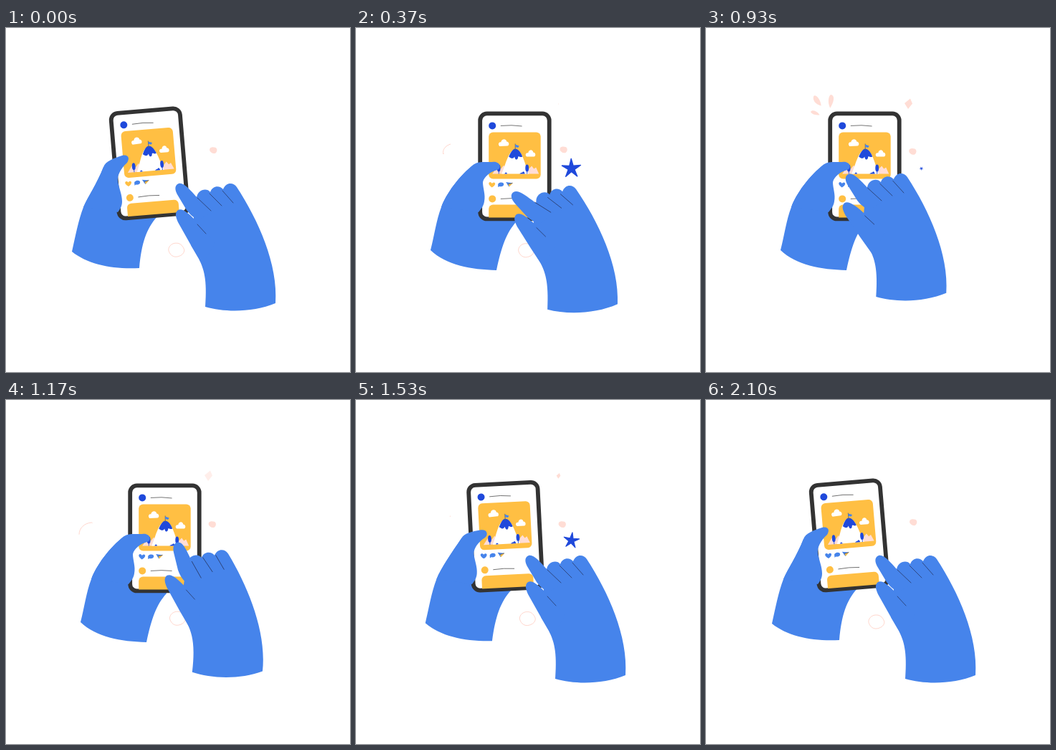
Animation of 480 by 480 pixels, one loop 2.13 s. Source, as an HTML page:

```html
<!DOCTYPE html>
<html lang="en">
<head>
<meta charset="utf-8">
<title>Tapping a post</title>
<style>
  html, body { margin: 0; width: 100%; height: 100%; overflow: hidden; background: #fff }
  svg { display: block; width: 100vw; height: 100vh }
  .skin { fill: #4684eb }
  .blue { fill: #1f49db }
  .sun { fill: #ffbf43 }
  .pink { fill: #ffddd5 }
  .line { fill: none; stroke: #666; stroke-width: .9; stroke-linecap: round }
  .fold { fill: none; stroke: #2c4276; stroke-width: .9; stroke-linecap: round }
  .thin { fill: none; stroke: #ffd6cc; stroke-width: 1 }
</style>
</head>
<body>
<svg viewBox="0 0 480 480">
  <defs>
    <clipPath id="screen"><rect x="175" y="122" width="92" height="143" rx="8"/></clipPath>
  </defs>

  <!-- floating decorations -->
  <path id="ring" class="thin" d="M-11,0C-11,-6 -5,-10 0,-9.500C6,-10 10,-4 11,0C11,6 5,9 0,9.500C-6,10 -10,5 -11,0Z"/>
  <path id="curl" class="thin" pathLength="100" d="M132,162C125,164 120,170 122,176C122,173 121,171 119,171C109,172 102,179 102,188C101,190 97,189 94,192"/>
  <path id="blob" class="pink" d="M-5,-1C-5,-5 0,-5 3,-4C6,-3 6,2 3,4C0,5 -5,3 -5,-1Z"/>
  <path id="gem" class="pink" d="M2.500,-7.500L5.500,-.5L-.5,7L-5.500,-1Z"/>
  <path id="star" class="blue" stroke="#1f49db" stroke-width="1.500" stroke-linejoin="round"/>
  <g id="burst" class="pink">
    <path d="M161,109C153,107 149,101 151,96C153,93 160,99 161,109Z"/>
    <path d="M173,112C169,104 171,95 174,94C180,95 178,104 173,112Z"/>
    <path d="M159,121C154,122 148,120 147,117C148,114 155,115 159,121Z"/>
  </g>

  <path id="palm" class="skin"/>
  <g id="phone">
    <rect x="173" y="120" width="96.500" height="147" rx="9.500" fill="#fff" stroke="#333" stroke-width="5.800"/>
    <circle class="blue" cx="190" cy="137" r="5"/>
    <path class="line" d="M202,137Q217,135.500 231,137.500M202,239Q217,237.500 231,239"/>
    <rect class="sun" x="185" y="146" width="72.500" height="65" rx="6"/>
    <g fill="#fff">
      <path d="M200,165.500C197,162 200,159 202,160C203,154 210,155 210,159C214,159 214,165 211,165Z"/>
      <path d="M238,180C235,178 237,174 240,175C241,169 247,170 247,174C251,174 251,180 248,180Z"/>
    </g>
    <path class="pink" d="M190,204L197,194L202,197L206,192L211,204ZM234,204L242,196L245,193L248,197L251,195L255,204Z"/>
    <path fill="#fff" d="M203,204C208,194 212,171 222,170C233,171 236,194 241,204Z"/>
    <path class="blue" d="M213,180C216,173 219,169 222,169C226,169 230,174 232,180C229,182 228,179 226,180C226,185 222,186 221,180C218,185 215,181 213,180Z"/>
    <path class="line" d="M222,162.500V171"/>
    <path class="skin" d="M222,163L227.500,165L226,167.500L222,166.500Z"/>
    <g class="blue">
      <ellipse cx="199" cy="196" rx="2.400" ry="5"/>
      <ellipse cx="238.500" cy="196" rx="2.400" ry="5"/>
      <path d="M198.600,199h.9v5h-.9ZM238.100,199h.9v5h-.9ZM207,204Q209,200 211,204ZM228,204Q230,202 232,202Q234,199 235.500,204Z"/>
    </g>
    <path id="heart" d="M189.500,223C183,219 185,215 187.500,215.800Q189,216.200 189.500,217.500Q190.500,216 192,216C195,216 195,220 189.500,223Z"/>
    <path class="skin" d="M198,220C197,215.500 206,214.500 206,218.500C206,222 202,222 200,221.500L198,222.500Z"/>
    <path class="skin" d="M209,215.500L218,216.800L213,222Z"/>
    <path class="sun" d="M212.500,218.500L218.500,217L213.500,222Z"/>
    <path class="line" d="M212,218.500L218,217"/>
    <circle class="sun" cx="190" cy="239" r="5"/>
    <rect class="sun" x="185" y="247" width="72" height="40" rx="6" clip-path="url(#screen)"/>
  </g>
  <path id="grip" class="skin"/>

  <g id="hand">
    <path class="skin" d="M278,389C281,350 276,336 269,322L258,303L262,264L266,238C266,226 280,222 285,229C288,220 298,219 303,225C307,215 317,215 322,222C352,268 380,330 376,384C345,397 305,397 278,389Z"/>
    <g id="thumb">
      <path class="skin" d="M264,268C254,258 246,251 240,254C235,258 237,264 240,271L258,303L274,330L292,300Z"/>
      <path class="fold" d="M267,274L279,287"/>
    </g>
    <g id="index">
      <path class="skin" d="M267,237C257,226 248,215 241,217C235,219 235,226 240,234L252,254C258,262 262,264 268,268L290,256Z"/>
      <path class="fold" d="M267,237L286,255"/>
    </g>
    <path id="fold1" class="fold" d="M284,231L301,248"/>
    <path id="fold2" class="fold" d="M302,227L317,244"/>
  </g>
</svg>
<script>
const LOOP = 2130;
const $ = id => document.getElementById(id);
const set = (id, name, value) => $(id).setAttribute(name, value);
const move = (id, value) => set(id, 'transform', value);

// left hand: upright and tilted outlines, behind and in front of the phone
const PALM = [
  'M104,310C109,291 112,268 119,250C126,231 144,206 165,190L200,200L224,270C210,285 203,305 196,338C160,337 126,331 104,310Z',
  'M92,312C97,290 101,268 108,250C114,236 127,217 136,194L170,200L211,263C196,280 189,300 186,335C150,337 114,330 92,312Z'];
const GRIP = [
  'M119,250C126,231 144,206 165,190C170,186 180,187 190,187C201,185 204,196 197,198C187,201 179,207 177,215C177,224 181,232 179,242C178,249 174,253 171,257Z',
  'M108,250C114,236 127,217 136,194C138,186 152,181 162,178C171,176 173,182 169,188C160,196 155,206 156,214C158,224 162,233 162,242C162,249 159,253 156,257Z'];

// key poses of the right hand: time, x, y, index finger turn
const HAND = [
  [30, 0, 0, 0], [230, -3, 8, -11], [370, -13, 3, -10], [560, -42, -12, 13], [750, -48, -9, -7],
  [930, -41, -14, -1], [1170, -15, -8, 15], [1380, 5, 2, -4], [1510, 0, 0, 0]];

function ease(from, to, t) {
  const u = Math.min(1, Math.max(0, (t - from) / (to - from)));
  return u * u * (3 - 2 * u);
}
const pop = (a, b, c, d, t) => ease(a, b, t) - ease(c, d, t);
const wave = (shift, t) => Math.cos((t - shift) / LOOP * 2 * Math.PI);

// monotone cubic through the keys, at rest outside them
function at(keys, t) {
  const last = keys.length - 1;
  t = Math.min(keys[last][0], Math.max(keys[0][0], t));
  const i = Math.max(0, keys.findIndex(k => k[0] >= t) - 1);
  const slope = (j, c) => j < 0 || j >= last ? 0 : (keys[j + 1][c] - keys[j][c]) / (keys[j + 1][0] - keys[j][0]);
  const tangent = (j, c) => {
    const a = slope(j - 1, c), b = slope(j, c);
    return a * b > 0 ? 2 * a * b / (a + b) : 0;
  };
  const p = keys[i], q = keys[i + 1], h = q[0] - p[0], u = (t - p[0]) / h, v = 1 - u;
  return [1, 2, 3].map(c => p[c] * v * v * (1 + 2 * u) + q[c] * u * u * (3 - 2 * u)
    + h * u * v * (v * tangent(i, c) - u * tangent(i + 1, c)));
}

// mix two outlines of equal structure
function blend([a, b], f) {
  const ends = b.match(/\d+/g);
  let i = 0;
  return a.replace(/\d+/g, n => (+n + (ends[i++] - n) * f).toFixed(2));
}

set('star', 'd', 'M' + Array.from({ length: 10 }, (_, i) => {
  const r = i % 2 ? 4.8 : 14.5, a = (i * 36 - 92) * Math.PI / 180;
  return [r * Math.cos(a), r * Math.sin(a)];
}).join('L') + 'Z');

function drawPhone(t) {
  const tilt = 1 - pop(30, 360, 1200, 1780, t);
  move('phone', `translate(.2 -.6) rotate(${-4.8 * tilt} 163 445)`);
  set('palm', 'd', blend(PALM, tilt));
  set('grip', 'd', blend(GRIP, tilt));
  set('heart', 'class', t < 800 ? 'sun' : 'skin');
}

function drawHand(t) {
  const [x, y, index] = at(HAND, t);
  const thumb = x / 9;
  move('hand', `translate(${x} ${y}) rotate(${index / 7} 310 300)`);
  move('index', `rotate(${index} 278 254)`);
  move('thumb', `translate(${.6 * thumb} 0) rotate(${thumb} 290 295)`);
  move('fold1', `rotate(${.6 * index} 301 248)`);
  move('fold2', `rotate(${.6 * index} 317 244)`);
}

function drawDecor(t) {
  const star = pop(200, 400, 600, 1050, t) + pop(1150, 1700, 1830, 2080, t);
  move('star', `translate(300.5 196) rotate(${48 - 50 * star}) scale(${star})`);

  const gem = pop(250, 900, 1250, 1300, t) + pop(1300, 1750, 1800, 2080, t);
  move('gem', `translate(282.5 106) scale(${gem})`);
  set('gem', 'opacity', 1 - pop(1080, 1260, 1270, 1320, t));

  move('blob', `translate(${288.5 + wave(300, t)} ${172 - 2 * wave(300, t)})`);
  move('ring', `translate(${238.5 - wave(250, t)} ${307.5 + 3 * wave(250, t)})`);
  move('burst', `translate(168 118) scale(${1.08 * pop(780, 950, 1080, 1150, t)}) translate(-168 -118)`);

  // a short dash runs along the curl three times per loop
  const start = [335, 1078, 1529].find(s => t >= s && t < s + 160);
  set('curl', 'visibility', start ? 'visible' : 'hidden');
  if (start) {
    const along = ms => Math.min(100, Math.max(0, (t - start - ms) / 1.1));
    set('curl', 'stroke-dasharray', `0 ${along(50)} ${along(0) - along(50)} 200`);
  }
}

const begin = performance.now();
function tick() {
  const t = (performance.now() - begin) % LOOP;
  drawPhone(t);
  drawHand(t);
  drawDecor(t);
  requestAnimationFrame(tick);
}
tick();
</script>
</body>
</html>
```
